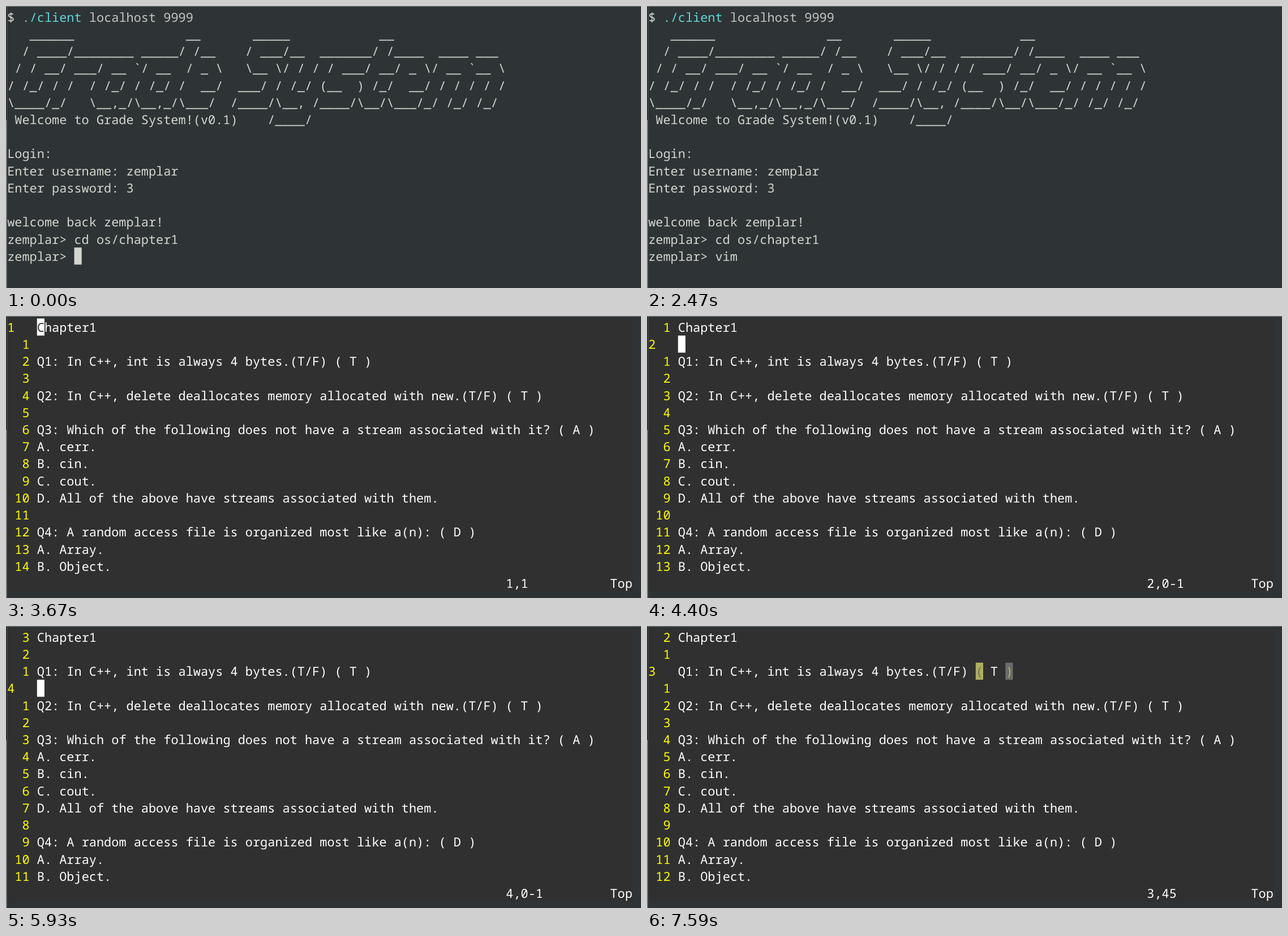
These frames come from a looping animation (1122x499 px, 8000 ms). An HTML page:

```html
<!DOCTYPE html>
<html lang="en">
<head>
<meta charset="utf-8">
<title>Grade System terminal</title>
<style>
  html, body { margin: 0; width: 100%; height: 100%; overflow: hidden; background: #2e3436; }
  svg { display: block; width: 1122px; height: 499px; }
  text {
    font: 21.92px "Noto Sans Mono", monospace;
    font-variant-ligatures: none;
    text-rendering: geometricPrecision;
    white-space: pre;
  }
</style>
</head>
<body>
<svg viewBox="0 0 1122 499">
  <rect width="1122" height="499" fill="#2e3436"/>
  <g id="screen"></g>
  <rect x="1" width="1" height="499" fill="#5c6062"/>
  <rect width="1" height="202" fill="#0c0d0e"/>
  <rect y="202" width="1" height="297" fill="#85898a"/>
  <rect width="1122" height="1" fill="#808384"/>
</svg>
<script>
const LOOP = 8000;
const CELL = { x: 2.2, y: 4.4, w: 13.15, h: 30.21, base: 23.4 };
const COLS = 84, ROWS = 16;
const SHELL = { bg: '#2e3436', fg: '#d3d7cf', command: '#5fd7d7', param: '#c4c6c2' };
const EDITOR = { bg: '#303030', fg: '#ffffff', number: '#ffff00', match: '#afaf5f', matchText: '#6c6c6c' };
const USER = 'zemplar';

const banner = String.raw`
   ______               __       _____            __
  / ____/________ _____/ /__    / ___/__  _______/ /____  ____ ___
 / / __/ ___/ __ ${'`'}/ __  / _ \   \__ \/ / / / ___/ __/ _ \/ __ ${'`'}__ \
/ /_/ / /  / /_/ / /_/ /  __/  ___/ / /_/ (__  ) /_/  __/ / / / / /
\____/_/   \__,_/\__,_/\___/  /____/\__, /____/\__/\___/_/ /_/ /_/
 Welcome to Grade System!(v0.1)    /____/`.split('\n');

const session = [
  ...banner, '',
  'Login:',
  `Enter username: ${USER}`,
  'Enter password: 3',
  '',
  `welcome back ${USER}!`,
  `${USER}> cd os/chapter1`,
];

const questions = [
  'Chapter1',
  '',
  'Q1: In C++, int is always 4 bytes.(T/F) ( T )',
  '',
  'Q2: In C++, delete deallocates memory allocated with new.(T/F) ( T )',
  '',
  'Q3: Which of the following does not have a stream associated with it? ( A )',
  'A. cerr.',
  'B. cin.',
  'C. cout.',
  'D. All of the above have streams associated with them.',
  '',
  'Q4: A random access file is organized most like a(n): ( D )',
  'A. Array.',
  'B. Object.',
];

const escape = s => s.replace(/&/g, '&amp;').replace(/</g, '&lt;').replace(/>/g, '&gt;');

function text(row, col, string, fill) {
  if (!string) return '';
  const x = CELL.x + col * CELL.w;
  const y = CELL.y + row * CELL.h + CELL.base;
  return `<text x="${x}" y="${y}" fill="${fill}">${escape(string)}</text>`;
}

function block(row, col, fill, cols = 1, rows = 1) {
  return `<rect x="${CELL.x + col * CELL.w}" y="${CELL.y + row * CELL.h}"
    width="${cols * CELL.w}" height="${rows * CELL.h}" fill="${fill}"/>`;
}

const highlighted = (row, col, char, bg, fg) => block(row, col, bg) + text(row, col, char, fg);

function shell(typed, cursor, entered = false) {
  const prompt = `${USER}> ${typed}`;
  let out = text(0, 0, '$', SHELL.fg)
    + text(0, 2, './client', SHELL.command)
    + text(0, 11, 'localhost 9999', SHELL.param);
  session.forEach((line, row) => { if (row) out += text(row, 0, line, SHELL.fg); });
  out += text(14, 0, prompt, SHELL.fg);
  if (cursor) out += entered ? block(15, 0, SHELL.fg) : block(14, prompt.length, SHELL.fg);
  return out;
}

function editor(line, cursor, col = 1) {
  const current = line - 1;
  const content = questions[current];
  let out = block(0, 0, EDITOR.bg, COLS, ROWS);
  questions.forEach((string, row) => {
    const number = row === current ? `${line}` : `${Math.abs(row - current)}`.padStart(3);
    out += text(row, 0, number, EDITOR.number) + text(row, 4, string, EDITOR.fg);
  });
  out += text(15, 67, `${line},${content ? col : '0-1'}`, EDITOR.fg) + text(15, 81, 'Top', EDITOR.fg);

  const char = content[col - 1] || '';
  if (char === ')') {
    const open = content.lastIndexOf('(');
    out += highlighted(current, 4 + open, '(', EDITOR.match, EDITOR.matchText)
      + highlighted(current, 3 + col, ')', EDITOR.matchText, EDITOR.match);
  } else if (cursor) {
    out += highlighted(current, 3 + col, char, EDITOR.fg, EDITOR.bg);
  }
  return out;
}

const steps = [
  [0, shell('', true)],
  [580, shell('', false)],
  [1180, shell('', true)],
  [1720, shell('v', true)],
  [1820, shell('vi', true)],
  [1930, shell('vim', true)],
  [2470, shell('vim', false)],
  [3060, shell('vim', true)],
  [3600, shell('vim', true, true)],
  [3670, editor(1, true)],
  [4130, editor(1, false)],
  [4340, editor(1, true)],
  [4400, editor(2, true)],
  [4530, editor(3, true)],
  [5050, editor(3, false)],
  [5650, editor(3, true)],
  [5930, editor(4, true)],
  [6200, editor(3, true)],
  [6450, editor(4, true)],
  [6600, editor(3, true)],
  [7120, editor(3, false)],
  [7250, editor(3, true)],
  [7590, editor(3, true, 45)],
];

const screen = document.getElementById('screen');
const start = performance.now();
let shown;

function draw() {
  const time = (performance.now() - start) % LOOP;
  const step = steps.findLast(([from]) => from <= time);
  if (step !== shown) {
    screen.innerHTML = step[1];
    shown = step;
  }
  requestAnimationFrame(draw);
}
draw();
</script>
</body>
</html>
```
